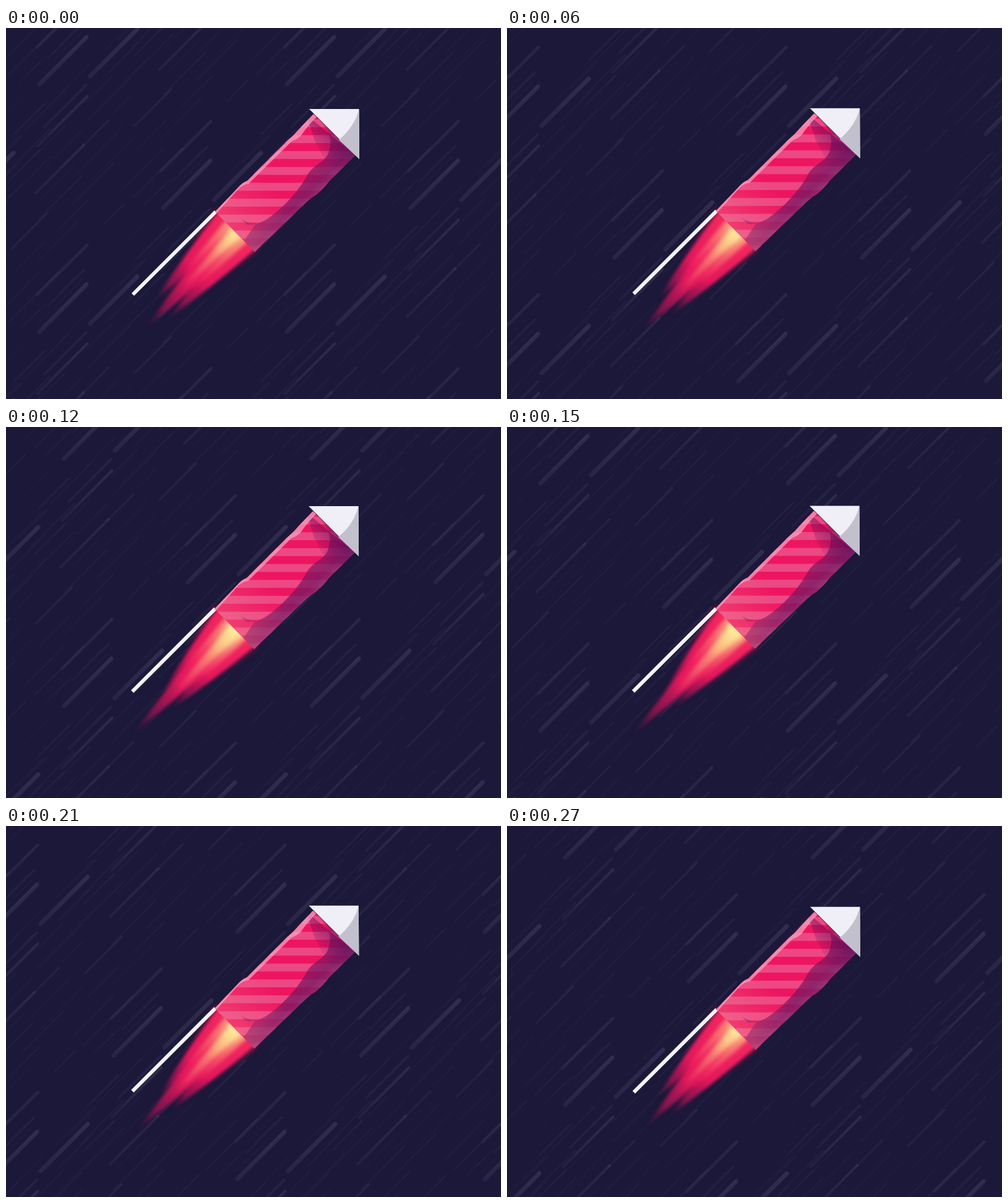
An HTML page with a canvas that plays this animation: 800 by 600 pixels, repeating every 300 ms.

```html
<!DOCTYPE html>
<html lang="en">
<head>
<meta charset="utf-8">
<title>Firework rocket</title>
<style>
html, body { margin: 0; width: 100%; height: 100%; overflow: hidden; background: #1c1839; }
canvas { display: block; }
</style>
</head>
<body>
<canvas id="stage" width="800" height="600"></canvas>
<script>
const ctx = document.getElementById('stage').getContext('2d');
const STEP = 30, STEPS = 10;

function seeded(seed) {
  return () => {
    seed = (seed * 16807) % 2147483647;
    return seed / 2147483647;
  };
}

function fade(c, x0, y0, x1, y1, ...stops) {
  const g = c.createLinearGradient(x0, y0, x1, y1);
  stops.forEach(([at, color]) => g.addColorStop(at, color));
  return g;
}

// Rain: x, y of the lower end, horizontal run, width, opacity
const streaks = [
  [136, 78, 76, 7, .105],
  [54, 91, 76, 7, .095],
  [51, 31, 80, 5, .07],
  [51, 191, 80, 5, .065],
  [248, 67, 78, 4, .08],
  [324, -9, 42, 3, .06],
  [5, 75, 80, 3, .045],
  [62, 160, 68, 4, .055],
  [68, 49, 58, 3, .05],
  [208, 158, 59, 3, .07],
  [132, 150, 70, 2.5, .035],
  [205, 75, 66, 2, .035]
];
const rnd = seeded(4127);
for (let i = 0; i < 34; i++) {
  streaks.push([rnd() * 400, rnd() * 200, 25 + rnd() * 60, 1.2 + rnd() * 1.5, .018 + rnd() * .03]);
}

function makeRain() {
  const tile = document.createElement('canvas');
  tile.width = tile.height = 400;
  const c = tile.getContext('2d');
  c.lineCap = 'round';
  for (const [x, y, run, width, a] of streaks) {
    c.lineWidth = width;
    for (let i = -4; i <= 4; i++) {
      for (let j = -4; j <= 4; j++) {
        if ((i + j) % 2) continue;
        const px = x + i * 200, py = y + j * 200;
        c.strokeStyle = fade(c, px, py, px + run, py - run,
          [0, `rgba(225,222,255,${a * .65})`], [1, `rgba(225,222,255,${a})`]);
        c.beginPath();
        c.moveTo(px, py);
        c.lineTo(px + run, py - run);
        c.stroke();
      }
    }
  }
  return ctx.createPattern(tile, 'repeat');
}
const rain = makeRain();

function shape(d, fill) {
  ctx.fillStyle = fill;
  ctx.fill(new Path2D(d));
}

// One tongue in flame space: u runs towards the tail, v across it
function tongue(v, half, tipU, tipV, fill) {
  const mid = tipU * .45, mv = v + (tipV - v) * .45;
  ctx.fillStyle = fill;
  ctx.beginPath();
  ctx.moveTo(-6, v - half);
  ctx.quadraticCurveTo(mid, mv - half * .72, tipU, tipV);
  ctx.quadraticCurveTo(mid, mv + half * .72, -6, v + half);
  ctx.fill();
}

function drawFlame(k) {
  const mix = (a, b) => a + (b - a) * k;
  const red = u => fade(ctx, 0, 0, u, 0,
    [0, 'rgba(244,40,96,.98)'], [.5, 'rgba(240,24,94,.92)'],
    [.78, 'rgba(190,20,90,.6)'], [1, 'rgba(110,20,80,0)']);
  const hot = (u, a) => fade(ctx, 0, 0, u, 0,
    [0, `rgba(255,222,140,${a})`], [.25, `rgba(252,180,125,${a * .9})`],
    [.6, `rgba(248,100,110,${a * .7})`], [1, 'rgba(240,30,95,0)']);
  const tips = [mix(172, 160), mix(213, 241), mix(178, 162)];

  ctx.save();
  ctx.translate(369, 330);
  ctx.transform(-Math.SQRT1_2, Math.SQRT1_2, Math.SQRT1_2, Math.SQRT1_2, 0, 0);
  ctx.filter = 'blur(5px)';
  tongue(0, 46, 185, 8, fade(ctx, 0, 0, 185, 0,
    [0, 'rgba(190,15,75,.85)'], [.5, 'rgba(140,15,75,.6)'], [1, 'rgba(90,15,70,0)']));
  ctx.filter = 'blur(2.5px)';
  tongue(-21, 20, tips[0], mix(-13, -7), red(tips[0]));
  tongue(23, 20, tips[2], mix(24, 20), red(tips[2]));
  tongue(0, 22, tips[1], mix(9, 4), red(tips[1]));
  ctx.filter = 'blur(3px)';
  tongue(-15, 8, 115, -11, hot(115, .55));
  tongue(18, 8, 120, 18, hot(120, .6));
  tongue(2, mix(11, 13), mix(140, 160), 6, hot(mix(140, 160), mix(.85, 1)));
  ctx.filter = 'blur(5px)';
  tongue(3, mix(11, 15), mix(55, 70), 4, fade(ctx, 0, 0, 70, 0,
    [0, 'rgba(255,238,160,.8)'], [1, 'rgba(255,210,130,0)']));
  ctx.restore();
}

const body = new Path2D('M497 139L474 163Q466 173 455 182L390 247Q384 249 378 255L338 297' +
  'L402 362L486 281Q492 275 501 270Q514 259 522 248L564 206Z');

function drawBody() {
  ctx.save();
  ctx.clip(body);
  ctx.fillStyle = '#ee1560';
  ctx.fillRect(330, 130, 250, 240);
  ctx.fillStyle = '#ec4883';
  for (let y = 147.6; y < 370; y += 25.7) ctx.fillRect(330, y, 250, 12.8);

  // Shaded side
  shape('M497 139C520 160 528 180 523 194C521 216 501 217 488 236C474 263 449 289 429 304' +
    'Q409 320 389 318L380 309Q394 317 404 316L384 345L402 364L575 212Z',
    fade(ctx, 455, 225, 512, 282,
      [0, 'rgba(150,25,95,.38)'], [.3, 'rgba(125,15,90,.62)'],
      [.65, 'rgba(112,24,98,.74)'], [1, 'rgba(128,68,125,.7)']));
  shape('M485 140L575 215L535 250L500 185Z',
    fade(ctx, 530, 172, 498, 204, [0, 'rgba(80,8,85,.5)'], [1, 'rgba(80,8,85,0)']));

  // Haze towards the nozzle
  ctx.fillStyle = fade(ctx, 370, 330, 435, 265,
    [0, 'rgba(245,150,150,.3)'], [1, 'rgba(245,120,150,0)']);
  ctx.fillRect(330, 230, 180, 140);

  // Lit edge
  shape('M490 135L503 143Q489 156 476 175Q470 180 462 183L392 252Q386 252 377 259L341 299L330 295Z',
    'rgba(250,165,195,.72)');
  ctx.restore();
}

function drawRocket(k) {
  ctx.save();
  ctx.translate(-k, -3.4 * k);
  drawFlame(k);
  ctx.strokeStyle = '#f3f2f5';
  ctx.lineWidth = 6;
  ctx.beginPath();
  ctx.moveTo(339, 297);
  ctx.lineTo(205, 431);
  ctx.stroke();
  drawBody();
  shape('M490 131H570.5L571 212Z', '#f0eef7');
  shape('M570.5 131L571 212L538 181Q564 159 570.5 131Z', '#c2c0cd');
  ctx.restore();
}

function draw(step) {
  const k = (1 - Math.cos(step / STEPS * 2 * Math.PI)) / 2;
  const shift = step * 40 % 200;
  ctx.fillStyle = '#1c1839';
  ctx.fillRect(0, 0, 800, 600);
  ctx.save();
  ctx.translate(-shift, shift);
  ctx.fillStyle = rain;
  ctx.fillRect(shift, -shift, 800, 600);
  ctx.restore();
  drawRocket(k);
}

const start = performance.now();
let shown = -1;
function tick() {
  const step = Math.floor((performance.now() - start) / STEP) % STEPS;
  if (step !== shown) draw(shown = step);
  requestAnimationFrame(tick);
}
tick();
</script>
</body>
</html>
```
